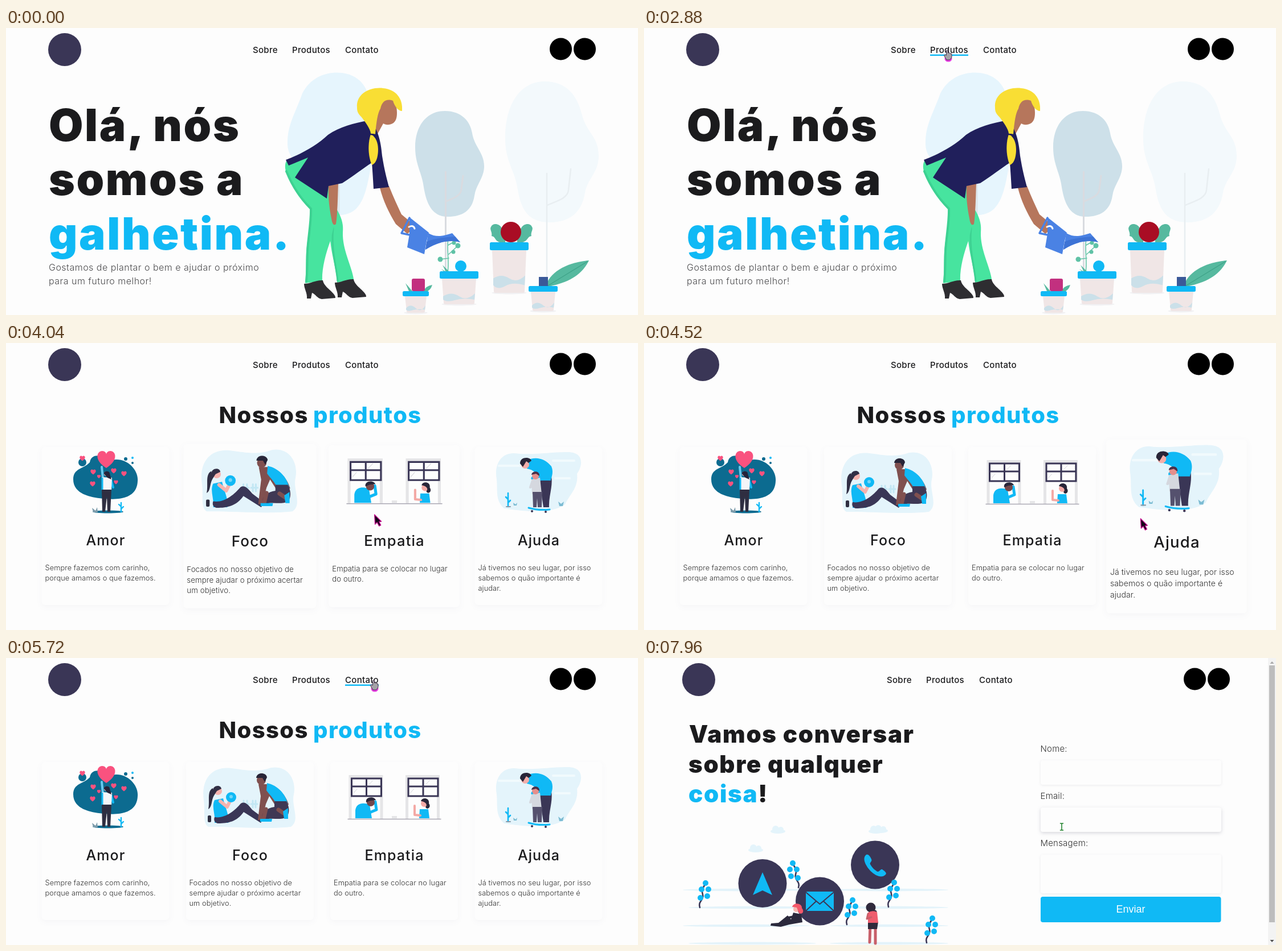
Animation, 1109 px wide and 505 px high, one loop 8000 ms. Source, as an HTML page:

```html
<!DOCTYPE html>
<html lang="pt">
<head>
<meta charset="utf-8">
<title>Galhetina</title>
<style>
html, body { margin: 0; width: 100%; height: 100%; overflow: hidden; background: #fdfdfd; }
svg { display: block; width: 1109px; height: 505px; }
text { font-family: Inter, "Open Sans", sans-serif; fill: #1b1b1d; white-space: pre; }
.nav { font-size: 15px; font-weight: 500; letter-spacing: .3px; }
.hero { font-size: 78px; font-weight: 900; letter-spacing: 2.6px; }
.lead { font-size: 16px; font-weight: 300; letter-spacing: .48px; fill: #4a4a4c; }
.head { font-size: 40px; font-weight: 800; letter-spacing: 1.4px; }
.talk { font-size: 42px; font-weight: 900; letter-spacing: 1.7px; }
.name { font-size: 25px; font-weight: 500; letter-spacing: 1.1px; text-anchor: middle; }
.body { font-size: 12.8px; font-weight: 300; letter-spacing: .08px; fill: #333; }
.label { font-size: 15px; font-weight: 300; letter-spacing: .2px; fill: #333; }
.send { font: 18px "Liberation Sans", Arial, sans-serif; fill: #fff; text-anchor: middle; }
.blue { fill: #10b9f5; }
.card { fill: #fdfdfd; filter: drop-shadow(0 3px 5px rgba(40, 40, 90, .04)); }
.field { fill: #fdfdfd; filter: drop-shadow(0 1px 2px rgba(40, 40, 70, .09)); }
.field.on { filter: drop-shadow(0 2px 3px rgba(40, 40, 70, .18)); }
</style>
</head>
<body>
<svg id="stage" viewBox="0 0 1109 505"></svg>
<script>
const SKY = '#10b9f5', INK = '#3a3656', PALE = '#e4f4fb', TEAL = '#56b99f', ROSE = '#f9527f';

// Drawing helpers
const path = (d, fill, more = '') => `<path d="${d}" fill="${fill}" ${more}/>`;
const line = (d, color, w) => path(d, 'none', `stroke="${color}" stroke-width="${w}" stroke-linecap="round" stroke-linejoin="round"`);
const dot = (x, y, r, fill) => `<circle cx="${x}" cy="${y}" r="${r}" fill="${fill}"/>`;
const oval = (x, y, rx, ry, fill) => `<ellipse cx="${x}" cy="${y}" rx="${rx}" ry="${ry}" fill="${fill}"/>`;
const rect = (x, y, w, h, fill, r = 0) => `<rect x="${x}" y="${y}" width="${w}" height="${h}" rx="${r}" fill="${fill}"/>`;
const text = (x, y, cls, s) => `<text x="${x}" y="${y}" class="${cls}">${s}</text>`;
const group = (id, s) => `<g id="${id}">${s}</g>`;

const heart = (x, y, s) => path('M0,.5C-.75,.02 -.55,-.5 -.24,-.5C-.1,-.5 0,-.4 0,-.3C0,-.4 .1,-.5 .24,-.5C.55,-.5 .75,.02 0,.5Z',
  ROSE, `transform="translate(${x} ${y}) scale(${s})"`);

function pot(x, y, w, rim, h) {
  const a = x + 4, b = x + w - 4, top = y + rim, end = top + h, m = top + h * .62;
  return oval(x + w / 2, end, w * .45, 2.5, '#f1f1f3')
    + path(`M${a},${top}H${b}L${b - 3},${end - 3}Q${b - 3},${end} ${b - 6},${end}H${a + 6}Q${a + 3},${end} ${a + 3},${end - 3}Z`, '#f0e6e6')
    + path(`M${a + 2},${m + 3}Q${x + w * .3},${m - 6} ${x + w * .5},${m + 3}T${b - 2},${m - 2}L${b - 3},${m + h * .2}Q${x + w * .6},${m + h * .12} ${x + w * .4},${m + h * .22}T${a + 2},${m + h * .2}Z`, '#cbe0e9')
    + rect(x, y, w, rim, SKY, 2.5);
}

function vine(x, y, flip = 1) {
  const beads = [[0, 0], [-7, 11], [5, 11], [-9, 26], [3, 23]];
  return `<g transform="translate(${x} ${y}) scale(${flip} 1)">`
    + line('M-10,43C-14,32 -2,30 -5,20S-3,8 0,0', INK, 2.6)
    + beads.map(([a, b]) => dot(a, b, 5, SKY)).join('') + '</g>';
}

const cloud = (x, y) => oval(x, y + 3, 13, 4, PALE) + dot(x - 4, y - 1, 6, PALE) + dot(x + 5, y, 5, PALE);

// Header
const links = [[433, 43, 'Sobre'], [502, 67, 'Produtos'], [595, 59, 'Contato']];
const header = dot(103, 38, 29, INK) + dot(973.5, 37, 19.5, '#000') + dot(1015.5, 37, 19.5, '#000')
  + links.map(([x, w, s], i) => text(x, 44, 'nav', s) + group('bar' + i, rect(x, 46.5, w, 2.5, SKY))).join('');

// Home page
const trees = path('M520,115C535,85 565,76 590,79C625,84 640,110 641,150C642,190 645,215 640,245C632,290 625,325 590,329C560,331 545,300 535,270C525,245 495,235 494,205C493,170 508,150 520,115Z', '#e6f5fd')
  + line('M584,250V330', '#dce5ea', 3)
  + path('M770,146C800,146 815,165 818,185C822,210 840,220 839,245C838,265 825,275 822,295C818,322 800,332 775,332C748,332 738,310 733,280C730,255 718,240 718,210C718,170 740,146 770,146Z', '#cde0e9')
  + line('M771.5,253V430M772,305C785,300 799,295 799,283L802,260', '#d9dbe0', 3)
  + path('M945,94C985,94 1002,120 1010,150C1018,185 1040,190 1040,225C1040,255 1020,265 1016,290C1010,325 990,341 955,342C920,342 905,325 898,285C893,250 876,235 876,195C876,130 905,94 945,94Z', '#f3f9fc')
  + line('M949,256V440M949,312C965,305 986,300 987,285L991,248', '#e8eef1', 2.5);

const SKIN = '#b6765c', NAVY = '#201f5b', HAIR = '#f9de34', GREEN = '#47e49f', SHADE = '#3dd192';
const boot = x => path('M0,448C11,448 21,441 33,442C35,455 56,464 55,473L31,475C23,474 20,466 14,464L12,474H5C6,464 0,457 0,448Z',
  '#2e2d31', `transform="translate(${x} 0)"`);
const gardener = path('M555,285C580,315 594,335 591,360C590,390 607,420 610,442L581,448C580,420 567,390 568,350Z', GREEN)
  + line('M574,352C570,390 580,420 582,445', SHADE, 3)
  + path('M493,232C488,240 489,250 495,262C505,285 522,305 534,318C535,340 529,370 527,393C526,415 527,430 525,449L555,445C554,425 560,400 569,375L577,342L566,280L530,226Z', GREEN)
  + line('M492,252C505,285 522,305 535,318C536,340 530,370 529,393C528,415 529,430 527,446', SHADE, 4)
  + `<g transform="translate(0 2)">${boot(523)}</g>` + boot(577)
  + path('M566,276L583,273C582,300 582,325 579,345Q573,350 571,335C567,315 565,295 566,276Z', SKIN)
  + path('M656,281L672,278C680,298 688,315 694,328L712,343Q711,360 704,362L684,345C672,325 662,305 656,281Z', SKIN)
  + path('M640,166L650,130L680,116C688,145 688,160 680,167C672,172 665,170 662,168L650,190Z', SKIN)
  + path('M491,232C518,222 546,206 565,188C585,174 612,167 634,163C652,170 658,200 660,225C664,250 668,265 672,280L645,283C644,265 643,250 642,237C628,246 610,260 590,273L566,278L563,300L507,263L530,228L496,242Z', NAVY)
  + path('M616,140C614,115 640,103 662,106C685,108 697,125 695,146C688,146 682,138 679,128C668,124 660,128 657,142C652,150 650,165 648,187L640,186C640,178 630,165 624,157C617,150 616,146 616,140Z', HAIR)
  + path('M640,187C651,192 655,208 652,225C650,236 646,239 642,241C636,228 634,205 640,187Z', HAIR)
  + line('M640,187L648,188', NAVY, 2.5);

const can = path('M708,333L742,360L738,375L734,398L704,386L708,362Z', '#4a82e4')
  + path('M741,361C756,370 770,365 783,361L797,377C775,372 757,377 736,390Z', '#4a82e4')
  + path('M738,376C752,370 770,368 788,367L797,377C775,372 757,377 736,390Z', '#3d73d5')
  + line('M708,334L694,361L708,364', '#4a82e4', 3.5) + line('M707,350Q715,346 717,353', '#fdfdfd', 3);

const plants = line('M775,430C778,410 773,390 776,370M777,405L762,407M777,398L792,384M776,382L785,377', '#62c3a6', 1.6)
  + [[775, 369, 4.5], [762, 407, 4.5], [793, 383, 4.5], [785, 394, 3.5], [786, 378, 3.5]].map(([x, y, r]) => dot(x, y, r, '#5fc2a6')).join('')
  + path('M778,429L766,417L772,429L764,424L770,430Z', TEAL)
  + path('M876,378C855,378 862,368 852,366C854,360 848,354 851,350C854,342 866,344 870,352C877,358 877,368 876,378ZM897,378C918,378 912,368 922,366C920,360 926,354 923,350C920,342 908,344 904,352C897,358 897,368 897,378Z', TEAL)
  + path('M947,456C952,430 985,412 1023,409C1010,436 985,449 947,456Z', TEAL) + line('M950,454L1020,411', '#3fa389', 1.2)
  + path('M713,463L701,449L707,463ZM733,463Q736,454 748,452Q745,462 737,464Z', TEAL)
  + rect(712, 441, 23, 22, '#c2307f', 3) + dot(798, 419, 10, SKY) + dot(886, 359, 18, '#a90d24') + rect(935, 438, 16, 16, '#3b5998')
  + pot(696, 463, 46, 9, 29) + pot(761, 428, 68, 13, 45) + pot(849, 377, 68, 14, 75) + pot(917, 454, 51, 10, 34);

const home = trees + gardener + plants + can
  + text(75, 198.5, 'hero', 'Olá, nós') + text(75, 294, 'hero', 'somos a') + text(75, 389.5, 'hero blue', 'galhetina.')
  + text(75, 427, 'lead', 'Gostamos de plantar o bem e ajudar o próximo') + text(75, 451, 'lead', 'para um futuro melhor!');

// Product pictures
const love = path('M118,240C118,220 136,222 147,210C150,192 170,198 186,206C210,200 233,222 231,243C230,270 205,277 175,274C140,272 118,262 118,240Z', '#0c6b90')
  + dot(134, 210, 7, '#0c6b90') + dot(210, 204, 3, '#0c6b90') + dot(222, 202, 2, SKY) + dot(222, 211, 2, '#0c6b90')
  + [[176, 205, 30], [134, 203, 9], [153, 227, 9], [163, 235, 6], [189, 225, 9], [207, 230, 9], [152, 248, 9], [193, 245, 7]].map(h => heart(...h)).join('')
  + oval(179, 297, 27, 2.5, '#0c6b90')
  + line('M170,238L168,218', '#67c9ee', 4) + line('M184,240L188,254', SKY, 4)
  + path('M168,236L186,237L185,260H168Z', '#f4f5f8') + line('M169,238V258', SKY, 3)
  + dot(176, 230, 4, '#f5b7b1') + path('M172,230C171,225 182,224 182,230L185,240L178,237Z', '#25233a')
  + path('M168,258H185L183,297H178L177,270L174,297H169Z', '#2f2e41')
  + line('M202,297V281M202,292L206,288M202,288L198,284', SKY, 2.4) + path('M153,298L151,290L157,295L160,289L161,298Z', '#7d9cab');

const focus = path('M347,250C342,215 360,190 395,194C420,197 440,202 465,193C495,188 510,215 505,240C500,260 517,285 500,297C460,302 390,296 355,297C344,290 350,270 347,250Z', PALE)
  + line('M414,257H426M430,257H441M417,251V263M423,251V263M433,251V263M438,251V263', '#c2e7f4', 3)
  + path('M366,250L381,247C384,262 392,275 390,290H366C368,275 360,262 366,250Z', SKY)
  + line('M376,252L388,262L394,250', '#f6b3ae', 6) + dot(372, 234, 7, '#f6b3ae')
  + path('M363,236C361,223 377,222 378,230L370,234L365,242C360,250 362,262 355,266C358,252 352,234 363,229Z', '#322f45')
  + dot(395, 245, 9, SKY) + dot(395, 244, 3, '#73d5f7')
  + path('M366,280C385,283 402,268 412,256C419,252 424,257 432,267L452,282L447,290L417,271C405,288 390,291 372,291C366,290 364,285 366,280Z', INK)
  + path('M443,222L457,222C474,222 491,240 496,258L476,265L462,243L456,257L449,285H442L447,243Z', '#80504f')
  + path('M458,220C477,224 491,240 494,256L477,262C471,248 462,240 457,233Z', SKY)
  + path('M471,252L492,252C498,263 497,272 494,278C485,288 468,279 451,285C446,274 454,265 471,262Z', '#3f3854')
  + line('M456,266L452,283M478,267L490,275', '#80504f', 7)
  + dot(448, 215, 8, '#80504f') + path('M439,211C440,200 457,201 458,210L454,218L450,211Z', '#282538')
  + path('M446,283H467L466,288H446ZM486,270L495,264L495,283H488Z', SKY) + rect(354, 277, 6, 12, '#2f2e41', 2);

const frame = x => rect(x, 206, 60, 77, '#e5e5e7') + rect(x + 5, 212, 50, 71, '#fdfdfd')
  + line(`M${x + 8},238L${x + 15},230M${x + 35},223L${x + 43},215`, '#d7d7dc', 1)
  + path(`M${x + 5},212h52v31h-52ZM${x + 31},212v31M${x + 5},226h52`, 'none', `stroke="${INK}" stroke-width="3"`);
const empathy = frame(601.5) + frame(701) + line('M600,283.5H763', '#aaa8b4', 1.4) + rect(677, 278, 9, 5, '#e5e5e7')
  + path('M613,282V268C614,256 626,253 638,258L642,282Z', SKY) + line('M638,272L650,267L648,253', SKY, 5)
  + dot(640, 254, 7, '#75484b') + path('M632,254C630,243 647,243 649,250L639,251Z', '#292639')
  + path('M725,282L726,266L741,266L743,282Z', SKY) + line('M727,277L717,276L717,260', '#f3a9a5', 4)
  + dot(734, 256, 6, '#f3a9a5') + path('M728,252C730,244 744,246 742,256C747,262 739,269 736,262C741,258 735,252 728,252Z', '#292639');

const help = path('M861,240C856,212 870,193 892,194C925,198 960,191 986,192C1015,192 1012,216 1002,230C1005,255 989,266 981,284C955,303 900,295 874,291C858,277 863,260 861,240Z', PALE)
  + line('M865,216H907M960,207H997M964,238H989', '#f1fafd', 4)
  + path('M936,235H957C960,252 952,270 953,289H943L938,254Z', INK)
  + path('M913,207C928,199 945,202 957,217C962,229 956,238 956,242H936C934,234 930,224 914,221Z', SKY)
  + line('M936,222L934,243L925,238', SKY, 7) + dot(911, 214, 7, '#f3aeaa')
  + path('M902,212C902,199 920,200 922,207L917,211L913,208L907,218Z', '#282538')
  + path('M922,240L937,237L940,266H923Z', '#d5d8df') + line('M924,242L920,254L927,250', '#d5d8df', 4)
  + path('M924,262H941L940,289H933L932,273L931,289H925Z', '#55516e') + dot(929, 234, 6, '#e58f8c')
  + path('M922,232C923,224 937,224 936,234L930,230Z', '#4a3048')
  + line('M917,290Q934,295 954,293', SKY, 3) + dot(923, 296, 2, INK) + dot(947, 297, 2, INK)
  + line('M881,288V264M881,281L885,277M881,275L877,271', SKY, 2.6) + line('M878,288H885', '#8a9aa8', 2)
  + path('M971,287L969,279L974,283L979,279L977,287ZM891,286L890,281L894,284L897,281L896,286Z', '#7dbcd3');

const cards = [
  [174.5, 69, 'Amor', love, ['Sempre fazemos com carinho,', 'porque amamos o que fazemos.'], 3540, 3700],
  [428, 322, 'Foco', focus, ['Focados no nosso objetivo de', 'sempre ajudar o próximo acertar', 'um objetivo.'], 3750, 3930],
  [681, 575.5, 'Empatia', empathy, ['Empatia para se colocar no lugar', 'do outro.'], 4000, 4150],
  [934.5, 829, 'Ajuda', help, ['Já tivemos no seu lugar, por isso', 'sabemos o quão importante é', 'ajudar.'], 4190, 4860]
];
const products = text(373.5, 141, 'head', 'Nossos') + text(539, 141, 'head blue', 'produtos')
  + cards.map(([cx, x, title, art, lines], i) => group('card' + i,
    `<rect x="${cx - 112}" y="183" width="224" height="278" rx="6" class="card"/>` + art + text(cx + .5, 356, 'name', title)
    + lines.map((s, n) => text(x - .5, 399.5 + n * 18, 'body', s)).join(''))).join('');

// Contact page
const streak = (x, y, w) => oval(x, y, w, 2.2, '#e3f3fa');
const scene = cloud(235, 302) + cloud(196, 335) + cloud(407, 302) + cloud(415, 301)
  + [408, 439, 471, 502].map((y, i) => streak(i % 2 ? 190 : 180, y, 112) + streak(430, y, 104)).join('')
  + dot(208, 396.5, 42.5, INK) + dot(308.5, 428, 42.5, INK) + dot(405.5, 364, 42.5, INK)
  + path('M208,377L225,417L208,409L191,417Z', SKY)
  + rect(284, 411, 49, 34, SKY, 3) + line('M285,413L308.5,433L332,413M285,444L302,428M332,444L315,428', INK, 2)
  + path('M389,347C392,344 396,347 399,354C401,358 395,360 397,363C401,370 406,374 410,376C414,376 415,371 418,372C424,376 427,379 423,382C417,387 408,384 400,377C391,369 382,354 389,347Z', SKY)
  + vine(108, 396) + vine(261, 361, -1) + vine(439, 395) + vine(366, 426) + vine(506, 458)
  + path('M262,448L276,451L278,465L255,469L240,473L222,471L223,467L236,466L252,453L258,460Z', '#2b293c')
  + line('M268,454L253,457', '#2b293c', 4) + dot(267, 442, 5, '#f6b7b0') + path('M260,438C262,429 278,431 277,440C282,446 278,452 272,449L268,439Z', '#f4586a')
  + dot(399, 444, 5, '#74454b') + dot(398, 439, 8.5, '#302a3c') + dot(405, 447, 3.5, '#302a3c')
  + line('M397,468L396,500M406,468L406,502', '#c8606a', 5) + path('M393,464H411L409,477H393Z', '#302a3c')
  + path('M393,448Q401,443 409,447L411,466H393Z', '#ef5d6e') + line('M393,450L391,459L399,456', '#c8606a', 3);

const field = (id, y, h) => `<rect id="${id}" x="696" y="${y}" width="317" height="${h}" rx="4" class="field"/>`;
const contact = text(79, 149, 'talk', 'Vamos conversar') + text(78, 201.5, 'talk', 'sobre qualquer')
  + text(78, 254, 'talk', '<tspan class="blue">coisa</tspan>!') + scene
  + text(695.5, 165, 'label', 'Nome:') + text(695.5, 248, 'label', 'Email:') + text(695.5, 331, 'label', 'Mensagem:')
  + field('nome', 180, 43) + field('email', 263, 43) + field('msg', 346, 68)
  + rect(696, 420, 316.5, 45, SKY, 4) + text(854, 448, 'send', 'Enviar')
  + rect(1095, 0, 14, 505, '#f3f3f3') + rect(1097, 13, 10, 452, '#bdbdbd')
  + path('M1098.5,10H1105.5L1102,6Z', '#a8a8a8') + path('M1098.5,496H1105.5L1102,500Z', '#505050');

// Pointers, drawn with the hot spot at 0,0
const pointers = {
  beam: line('M-2.5,-6H-.8L0,-5L.8,-6H2.5M0,-5V5M-2.5,6H-.8L0,5L.8,6H2.5', '#1b7f27', 1.5),
  arrow: path('M0,0L1,17L4.5,13.5L8,20L11,18.5L8,12.5L12,12Z', '#15061a', 'stroke="#c0128c" stroke-width="1.4" stroke-linejoin="round"'),
  hand: oval(2, 15, 6.5, 5.5, '#e53be0')
    + path('M-1.5,1Q0,-2 1.5,1V5Q4,3 5,6Q8,5 8,8V12Q7,16 4,17H-1Q-4,13 -5.5,9Q-4,7 -1.5,9Z', '#a5a3a8', 'stroke="#47344c" stroke-width="1"')
};

document.getElementById('stage').innerHTML = group('home', home) + group('products', products) + group('contact', contact)
  + group('header', header) + group('pointer', Object.keys(pointers).map(k => group(k, pointers[k])).join(''));

// Timeline
const LOOP = 8000;
const pages = [[0, 'home'], [3160, 'products'], [5840, 'contact']];
const kinds = [[0, ''], [1120, 'arrow'], [1260, 'beam'], [1840, 'arrow'], [2270, 'hand'], [2430, 'arrow'], [2540, 'hand'],
  [3390, 'arrow'], [5500, 'hand'], [5960, 'arrow'], [6200, 'beam'], [6620, 'arrow'], [7000, 'beam']];
const bars = [[2270, 2430], [2540, 3390], [5500, 5960]];
const track = [[1120, 60, -20], [1400, 143, 110], [1720, 215, 120], [2100, 380, 60], [2400, 470, 36], [2640, 532, 39],
  [3320, 532, 39], [3560, 190, 290], [3740, 300, 320], [3930, 541, 318], [4040, 646, 302], [4520, 871, 309],
  [4800, 960, 260], [5200, 900, 120], [5600, 645, 39], [5900, 645, 39], [6300, 760, 200], [6760, 745, 235],
  [7200, 760, 290], [7560, 790, 298], [7920, 733, 297], [8000, 733, 297]];

const $ = id => document.getElementById(id);
const show = (id, on) => { $(id).style.display = on ? '' : 'none'; };
const current = (list, t) => list.filter(e => e[0] <= t).pop()[1];
const within = (t, [a, b]) => t >= a && t < b;
const easeOut = x => { x = Math.min(1, Math.max(0, x)); return 1 - (1 - x) ** 2; };

const slope = (i, k) => (track[i + 1][k] - track[i][k]) / (track[i + 1][0] - track[i][0]);
function tangent(i, k) {
  if (i === 0 || i === track.length - 1) return 0;
  const a = slope(i - 1, k), b = slope(i, k);
  return a * b > 0 ? 2 * a * b / (a + b) : 0;
}
// Monotone cubic through the track, so the pointer never overshoots a stop
function along(t, k) {
  let i = 0;
  while (i < track.length - 2 && track[i + 1][0] <= t) i++;
  const d = track[i + 1][0] - track[i][0], u = Math.max(0, (t - track[i][0]) / d), v = 1 - u;
  return track[i][k] * (1 + 2 * u) * v * v + track[i + 1][k] * u * u * (3 - 2 * u)
    + d * u * v * (v * tangent(i, k) - u * tangent(i + 1, k));
}

function draw(t) {
  const page = current(pages, t), kind = current(kinds, t);
  pages.forEach(([, id]) => show(id, id === page));
  $('header').setAttribute('transform', `translate(${page === 'contact' ? -7 : 0} 0)`);
  bars.forEach((b, i) => show('bar' + i, within(t, b)));
  cards.forEach(([cx, , , , , a, b], i) => {
    const s = 1 + .1 * easeOut((t - a) / 300) * (1 - easeOut((t - b) / 300));
    $('card' + i).setAttribute('transform', `translate(${cx} 315) scale(${s}) translate(${-cx} -315)`);
  });
  $('nome').classList.toggle('on', within(t, [6200, 6620]));
  $('email').classList.toggle('on', t >= 7000);
  Object.keys(pointers).forEach(k => show(k, k === kind));
  $('pointer').setAttribute('transform', `translate(${along(t, 1)} ${along(t, 2)})`);
}

const start = performance.now();
function tick() {
  draw((performance.now() - start) % LOOP);
  requestAnimationFrame(tick);
}
tick();
</script>
</body>
</html>
```
